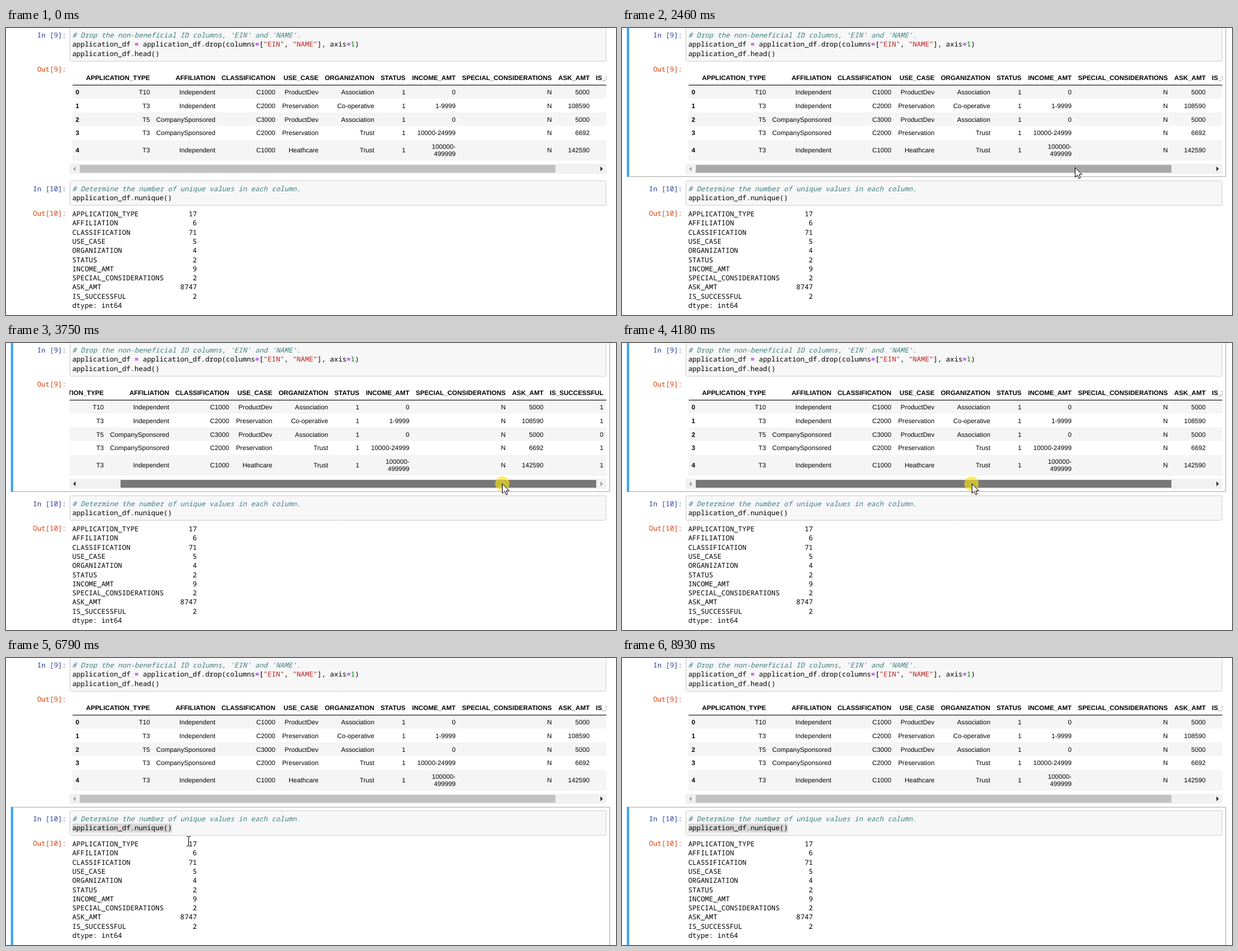
Write an HTML page with a canvas that moves like this. It is 1017x480 px and loops after 10000 ms.

```html
<!DOCTYPE html>
<html lang="en">
<head>
<meta charset="utf-8">
<title>Notebook</title>
<style>
  html, body { margin: 0; width: 100%; height: 100%; overflow: hidden; background: #fff; }
  canvas { display: block; width: 1017px; height: 480px; }
</style>
</head>
<body>
<canvas id="stage"></canvas>
<script>
const W = 1017, H = 480, LOOP = 10000;
const canvas = document.getElementById('stage');
const ctx = canvas.getContext('2d');
const dpr = window.devicePixelRatio || 1;
canvas.width = W * dpr;
canvas.height = H * dpr;
ctx.scale(dpr, dpr);
ctx.textRendering = 'geometricPrecision';

// Code metrics: left edge, character advance, line height
const X0 = 110.4, CW = 6.93, LH = 15.3;
const MONO = '11.55px "Noto Sans Mono", monospace';
const SANS = '10.8px "Liberation Sans", Arial, sans-serif';

const LEFT = 106, RIGHT = 1001;
const THUMB = { x: 123, w: 793, travel: 68, scroll: 77 };
const INK = '#000', COMMENT = '#408080', STRING = '#ba2121', OP = '#aa22ff', NUM = '#008800';

const columns = [
  ['APPLICATION_TYPE', 240, 'T10 T3 T5 T3 T3'],
  ['AFFILIATION', 349, 'Independent Independent CompanySponsored CompanySponsored Independent'],
  ['CLASSIFICATION', 449, 'C1000 C2000 C3000 C2000 C1000'],
  ['USE_CASE', 521, 'ProductDev Preservation ProductDev Preservation Heathcare'],
  ['ORGANIZATION', 614, 'Association Co-operative Association Trust Trust'],
  ['STATUS', 666, '1 1 1 1 1'],
  ['INCOME_AMT', 749.5, '0 1-9999 0 10000-24999 100000-|499999'],
  ['SPECIAL_CONSIDERATIONS', 910, 'N N N N N'],
  ['ASK_AMT', 973, '5000 108590 5000 6692 142590'],
  ['IS_SUCCESSFUL', 1073, '1 1 0 1 1']
];
const rowBase = [111, 134, 157, 179, 208];

const unique = [17, 6, 71, 5, 4, 2, 9, 2, 8747, 2];
const output = columns.map(([name], i) => name.padEnd(22) + String(unique[i]).padStart(8));
output.push('dtype: int64');

// Pointer path: time, x, y
const path = [
  [660, 954, 455], [1000, 900, 350], [1300, 815, 240], [1560, 780, 219],
  [1960, 780, 219], [2300, 755, 233], [2590, 755, 233], [2720, 760, 234],
  [2930, 802, 234], [3000, 806, 234], [3350, 828, 235], [3750, 828, 235],
  [4180, 583, 235], [4330, 540, 237], [4530, 320, 300], [4740, 112, 285],
  [4860, 112, 285], [5350, 230, 284], [5630, 308, 276], [5770, 334, 280],
  [6100, 334, 280], [6370, 304, 305], [6520, 304, 306], [6860, 304, 306],
  [7680, 326, 449], [8040, 326, 449], [8180, 350, 448], [8860, 805, 464]
];
const HIDE = 8930;
const presses = [[1760, 1960], [2700, 4330], [4810, 5900], [6860, 7750], [8040, 8180]];
const DRAG = presses[1], CODE = presses[2], OUT = presses[3];

const clamp = (v, lo, hi) => Math.max(lo, Math.min(hi, v));
const within = (t, [a, b]) => t >= a && t < b;

function pointer(t) {
  const i = path.findIndex(p => p[0] > t);
  if (i === 0) return path[0].slice(1);
  if (i < 0) return path[path.length - 1].slice(1);
  const [ta, xa, ya] = path[i - 1], [tb, xb, yb] = path[i];
  const k = (t - ta) / (tb - ta);
  return [xa + (xb - xa) * k, ya + (yb - ya) * k];
}

function rect(x, y, w, h, fill) {
  ctx.fillStyle = fill;
  ctx.fillRect(x, y, w, h);
}

function text(str, x, y, font, color = INK, align = 'left') {
  ctx.font = font;
  ctx.fillStyle = color;
  ctx.textAlign = align;
  ctx.fillText(str, x, y);
}

function polygon(points, fill, stroke) {
  ctx.beginPath();
  points.forEach(([x, y]) => ctx.lineTo(x, y));
  ctx.closePath();
  ctx.fillStyle = fill;
  ctx.fill();
  if (stroke) {
    ctx.strokeStyle = stroke;
    ctx.lineWidth = 1;
    ctx.stroke();
  }
}

function codeLine(y, ...parts) {
  let col = 0;
  for (const [str, color = INK, style = ''] of parts) {
    text(str, X0 + col * CW, y, `${style} ${MONO}`, color);
    col += str.length;
  }
}

function prompt(str, y, color) {
  text(str, 100.5, y, MONO, color, 'right');
}

function inputBox(y, h) {
  ctx.beginPath();
  ctx.roundRect(LEFT + 0.5, y + 0.5, RIGHT - LEFT - 1, h, 2);
  ctx.fillStyle = '#f7f7f7';
  ctx.fill();
  ctx.strokeStyle = '#cfcfcf';
  ctx.lineWidth = 1;
  ctx.stroke();
}

function cellFrame(y, h, editing) {
  ctx.strokeStyle = editing ? '#66bb6a' : '#ababab';
  ctx.lineWidth = 1;
  ctx.strokeRect(8.5, y + 0.5, 998, h);
  rect(8, y, 4, h + 1, editing ? '#66bb6a' : '#42a5f5');
}

function table(scroll) {
  ctx.save();
  ctx.beginPath();
  ctx.rect(LEFT, 60, RIGHT - LEFT, 165);
  ctx.clip();
  ctx.translate(-scroll, 0);
  for (const [y, h] of [[96, 22], [141, 23], [187, 35]]) rect(111, y, 967, h, '#f5f5f5');
  rect(111, 95, 967, 1, '#000');
  rowBase.forEach((y, i) => text(String(i), 122, y, `bold ${SANS}`, INK, 'right'));
  for (const [name, right, cells] of columns) {
    text(name, right, 87, `bold ${SANS}`, INK, 'right');
    cells.split(' ').forEach((cell, r) => {
      const lines = cell.split('|');
      lines.forEach((line, i) => {
        text(line, right, rowBase[r] + (i - (lines.length - 1) / 2) * 12, SANS, INK, 'right');
      });
    });
  }
  ctx.restore();
}

function scrollbar(offset, color) {
  rect(LEFT, 227, RIGHT - LEFT, 17, '#f1f1f1');
  rect(THUMB.x + offset, 229, THUMB.w, 13, color);
  const tint = on => on ? '#303030' : '#a3a3a3';
  polygon([[112, 235.5], [116, 231.5], [116, 239.5]], tint(offset > 0));
  polygon([[995, 235.5], [991, 231.5], [991, 239.5]], tint(offset < THUMB.travel));
}

function thumbOffset(t, x) {
  return within(t, DRAG) ? Math.round(clamp(x - 759, 0, THUMB.travel)) : 0;
}

// The anchor is the start of the second line, so going up selects line one.
function codeSelection(t, x, y) {
  if (t < CODE[0]) return;
  const color = t < 6790 ? '#d7d4f0' : '#d9d9d9';
  const held = within(t, CODE);
  const col = held ? clamp(Math.round((x - X0) / CW), 0, 24) : 24;
  if (held && y < 276.5) {
    const from = X0 + Math.floor((x - X0) / CW - 2) * CW;
    rect(from, 261, 997 - from, 15, color);
  } else {
    rect(X0, 277, col * CW, 15, color);
  }
}

function outputSelection(t) {
  if (t < OUT[0] || t >= 8110) return;
  const [x, y] = pointer(Math.min(t, OUT[1]));
  const last = clamp(Math.floor((y - 303.5) / LH), 0, 9);
  const col = clamp(Math.round((x - X0) / CW), 0, 30);
  for (let i = 0; i <= last; i++) {
    const from = i ? 0 : 28, to = i < last ? 31 : col;
    if (to <= from) continue;
    const top = Math.round(303.5 + i * LH), bottom = Math.round(303.5 + (i + 1) * LH);
    rect(X0 + from * CW, top, (to - from) * CW, bottom - top, '#0078d7');
    text(output[i].slice(from, to), X0 + from * CW, Math.round(315 + i * LH), MONO, '#fff');
  }
}

function drawPointer(x, y, pressed) {
  if (pressed) {
    ctx.beginPath();
    ctx.arc(x, y, 12, 0, Math.PI * 2);
    ctx.fillStyle = 'rgba(250, 228, 20, 0.64)';
    ctx.fill();
  }
  const px = Math.round(x), py = Math.round(y);
  const overText = px > LEFT && ((py > 255 && py < 297) || (py > 303 && py < 473));
  if (overText) {
    rect(px, py - 7, 1, 15, '#000');
    for (const dy of [-8, 8]) {
      rect(px - 3, py + dy, 3, 1, '#000');
      rect(px + 1, py + dy, 3, 1, '#000');
    }
  } else {
    const shape = [[0, 0], [0, 16], [3.7, 12.6], [6.2, 18.3], [8.8, 17.2], [6.3, 11.6], [11.3, 11.6]];
    polygon(shape.map(([a, b]) => [px + a + 0.5, py + b + 0.5]), '#fff', '#000');
  }
}

function draw(t) {
  const [x, y] = pointer(t);
  const visible = t >= 660 && t < HIDE;
  const offset = thumbOffset(t, x);
  const hover = visible && y >= 227 && y < 243 && x > THUMB.x && x < THUMB.x + THUMB.w;

  rect(0, 0, W, H, '#fff');
  if (within(t, [1760, CODE[0]])) cellFrame(-4, 252, false);
  if (t >= CODE[0]) cellFrame(249, 260, t < 6790);

  inputBox(-2, 57);
  prompt('In [9]:', 16, '#303f9f');
  codeLine(16, ["# Drop the non-beneficial ID columns, 'EIN' and 'NAME'.", COMMENT, 'italic']);
  codeLine(31, ['application_df '], ['=', OP, 'bold'], [' application_df.drop(columns'],
    ['=', OP, 'bold'], ['['], ['"EIN"', STRING], [', '], ['"NAME"', STRING], ['], axis'],
    ['=', OP, 'bold'], ['1', NUM], [')']);
  codeLine(47, ['application_df.head()']);
  prompt('Out[9]:', 73, '#d84315');
  table(Math.round(offset * THUMB.scroll / THUMB.travel));
  scrollbar(offset, within(t, DRAG) ? '#787878' : hover ? '#a8a8a8' : '#c1c1c1');

  inputBox(255, 41);
  codeSelection(t, x, y);
  prompt('In [10]:', 273, '#303f9f');
  codeLine(273, ['# Determine the number of unique values in each column.', COMMENT, 'italic']);
  codeLine(288, ['application_df.nunique()']);
  prompt('Out[10]:', 314, '#d84315');
  output.forEach((line, i) => text(line, X0, Math.round(315 + i * LH), MONO));
  outputSelection(t);

  if (visible) drawPointer(x, y, presses.some(p => within(t, p)));
}

const start = performance.now();
function tick() {
  draw((performance.now() - start) % LOOP);
  requestAnimationFrame(tick);
}
tick();
</script>
</body>
</html>
```
